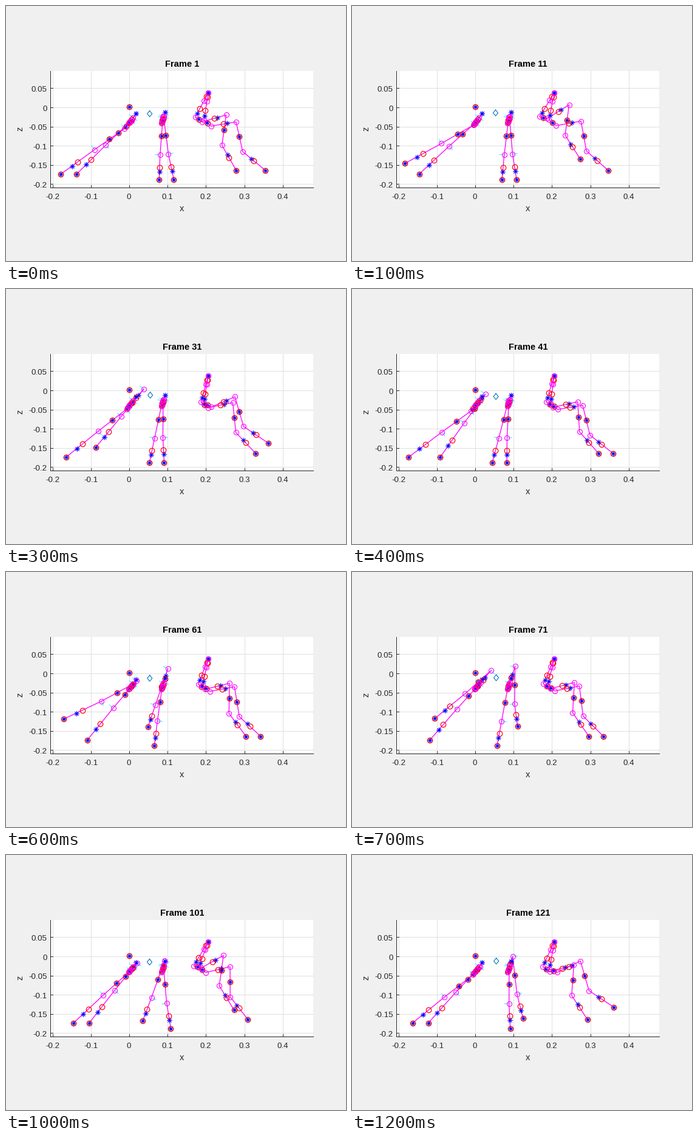
Write a matplotlib script that moves like this. It is 560 px wide and 420 px high and loops after 1300 ms.

```python
import numpy as np
import matplotlib.pyplot as plt
from matplotlib.animation import FuncAnimation

W, H, DPI = 560, 420, 80
PX = 72 / DPI                      # one pixel in points
FRAMES, INTERVAL = 13, 100
PERIOD = 13.6                      # gait cycle, in steps
SWING, STANCE = 2.7, 10.9          # their sum is the period
INK, GRID = "#262626", "#dfdfdf"
ORIGIN = np.array([202.8, 166.4])
SCALE = 632                        # pixels per unit
plt.rcParams["font.family"] = "Liberation Sans"

# Per joint, hip to foot: touchdown point, lift-off point, shift at swing apex.
FRONT = [
    [(327.8, 188.5), (310.7, 182.8), (-5, -1)],
    [(339.8, 198.9), (322.4, 190.1), (-3, -12)],
    [(381.1, 192.4), (361.4, 178.6), (-10, -39)],
    [(394.4, 241.3), (353.3, 228.7), (-7, -39)],
    [(433.2, 270.5), (375.8, 270.5), (-2, -44.5)],
]
MIDDLE = [
    [(256.4, 192.8), (256.4, 192.8), (0, 0)],
    [(259.7, 180.8), (257.2, 184.9), (11, -31)],
    [(271.1, 243.7), (238.2, 246.1), (3, -32)],
    [(282.9, 286), (224.6, 286.4), (0, -38)],
]
REAR = [
    [(201.9, 193.4), (201.9, 193.4), (0, 0)],
    [(221.5, 171.4), (193.2, 204.2), (15, -18)],
    [(187.4, 219.6), (143.2, 237.7), (8, -26.5)],
    [(149.2, 276.8), (86.8, 276.8), (-2, -42)],
]
FRONT_ROOT, MIDDLE_ROOT, REAR_ROOT = (333.3, 142.5), (262.4, 175.4), (214.4, 177.4)

# joints, root, spots along root-hip, share of the cycle ahead, side
LEGS = [
    (FRONT, FRONT_ROOT, (0, 0.32), 2 / 3, -1),
    (FRONT, FRONT_ROOT, (0, 0.32), 0, 1),
    (MIDDLE, MIDDLE_ROOT, (0, 0.4, 0.8), 1 / 3, -1),
    (MIDDLE, MIDDLE_ROOT, (0, 0.4, 0.8), 0, 1),
    (REAR, REAR_ROOT, (0, 0.4, 0.8), 2 / 3, -1),
    (REAR, REAR_ROOT, (0, 0.4, 0.8), 1 / 3, 1),
]


def gait(step):
    """Progress from touchdown (0) to lift-off (1), and height of the swing."""
    t = (step + 1.2) % PERIOD
    if t < STANCE:
        return t / STANCE, 0
    w = (t - STANCE) / SWING
    return 1 - w + np.sin(2 * np.pi * w) / (2 * np.pi), np.sin(np.pi * w)


def leg_points(joints, root, spots, step):
    back, up = gait(step)
    start, end, lift = np.array(joints, float).transpose(1, 0, 2)
    moving = start + back * (end - start) + up * lift
    upper = np.array(root) + np.outer(spots, moving[0] - root)
    return np.vstack([upper, moving])


fig = plt.figure(figsize=(W / DPI, H / DPI), dpi=DPI, facecolor="#f0f0f0")
ax = fig.add_axes([0, 0, 1, 1])
ax.set_xlim(0, W)
ax.set_ylim(H, 0)
ax.axis("off")


def line(xs, ys, color, width=1, z=1):
    return ax.plot(xs, ys, color=color, lw=width * PX, zorder=z)[0]


def label(x, y, text, size=13.33, color=INK, **kw):
    return ax.text(x, y, text, fontsize=size * PX, color=color, **kw)


def markers(marker, color, z, size=8, width=1.1):
    return ax.plot([], [], ls="none", marker=marker, ms=size * PX, mfc="none",
                   mec=color, mew=width * PX, zorder=z)[0]


# Axes
LEFT, RIGHT, TOP, BOTTOM = 72.5, 506, 107, 298.5
ax.fill([LEFT, RIGHT, RIGHT, LEFT], [TOP, TOP, BOTTOM, BOTTOM],
        color="white", lw=0, zorder=0)
for v in np.arange(-2, 5) / 10:
    x = np.floor(ORIGIN[0] - 0.35 + SCALE * v) + 0.5
    line([x, x], [TOP, BOTTOM], GRID)
    line([x, x], [BOTTOM, BOTTOM - 4], INK, z=2)
    label(x, 318.5, f"{v:g}", ha="center")
for v in np.arange(-4, 2) / 20:
    level = ORIGIN[1] - SCALE * v
    y = np.floor(level) + 0.5
    line([LEFT, RIGHT], [y, y], GRID)
    line([LEFT, LEFT + 4], [y, y], INK, z=2)
    label(67.5, level + 6.2, f"{v:g}", ha="right")
line([LEFT, LEFT], [TOP, BOTTOM], INK, z=2)
line([LEFT, RIGHT], [BOTTOM, BOTTOM], INK, z=2)
label(289.5, 337.8, "x", 14.67, ha="center")
label(23, 202, "z", 14.67, ha="center", va="center", rotation=90)
title = label(290, 100.5, "", 14.67, "black", ha="center", weight="bold")

# Moving parts
hinges = line([], [], "cyan", 0.9, z=3)
bones = [line([], [], "magenta", 1.3, z=4) for _ in LEGS]
masses = markers((8, 2, 0), "blue", 5, 8, 0.9)
mids = markers("o", "red", 6, 8.5, 1.2)
joints = markers("o", "magenta", 7)
body = line([], [], "#0072bd", 1.1, z=5)


def put(artist, pts):
    artist.set_data(*np.array(pts).T)


def draw(i):
    title.set_text(f"Frame {10 * i + 1}")
    joint_pts, mid_pts, mass_pts, hinge_pts = [], [ORIGIN], [ORIGIN], []
    for bone, (keys, root, spots, ahead, side) in zip(bones, LEGS):
        p = leg_points(keys, root, spots, i + ahead * PERIOD)
        front = keys is FRONT
        first = 0 if front else 1
        put(bone, p)
        joint_pts.extend(p[first:-1])
        mid_pts.extend([*((p[:-1] + p[1:]) / 2)[first:], p[-1]])
        share = np.array([0, 0.77, 0.45, 0.63, 0.5, 0.38 if front else 0.67])
        mass_pts.extend([*(p[:-1] + share[:, None] * np.diff(p, axis=0)), p[-1]])
        if not front:
            for j in (1, 4, 5):
                dx, dy = p[j + 1] - p[j]
                normal = side * np.array([dy, -dx]) / np.hypot(dx, dy)
                hinge_pts.extend([p[j], p[j] + 8 * normal, [np.nan, np.nan]])
    put(joints, joint_pts)
    put(mids, mid_pts)
    put(masses, mass_pts)
    put(hinges, hinge_pts)

    # The body bobs once for each pair of legs.
    turn = 2 * np.pi * 3 / PERIOD
    cx = 237 - 0.6 * np.cos(turn * (i - 0.65))
    cy = 175.8 + 1.7 * np.cos(turn * i)
    body.set_data(cx + np.array([0, 4, 0, -4, 0]), cy + np.array([-5, 0, 5, 0, -5]))
    return [title, hinges, *bones, joints, mids, masses, body]


anim = FuncAnimation(fig, draw, frames=FRAMES, interval=INTERVAL,
                     repeat=True, repeat_delay=0)
plt.show()
```
